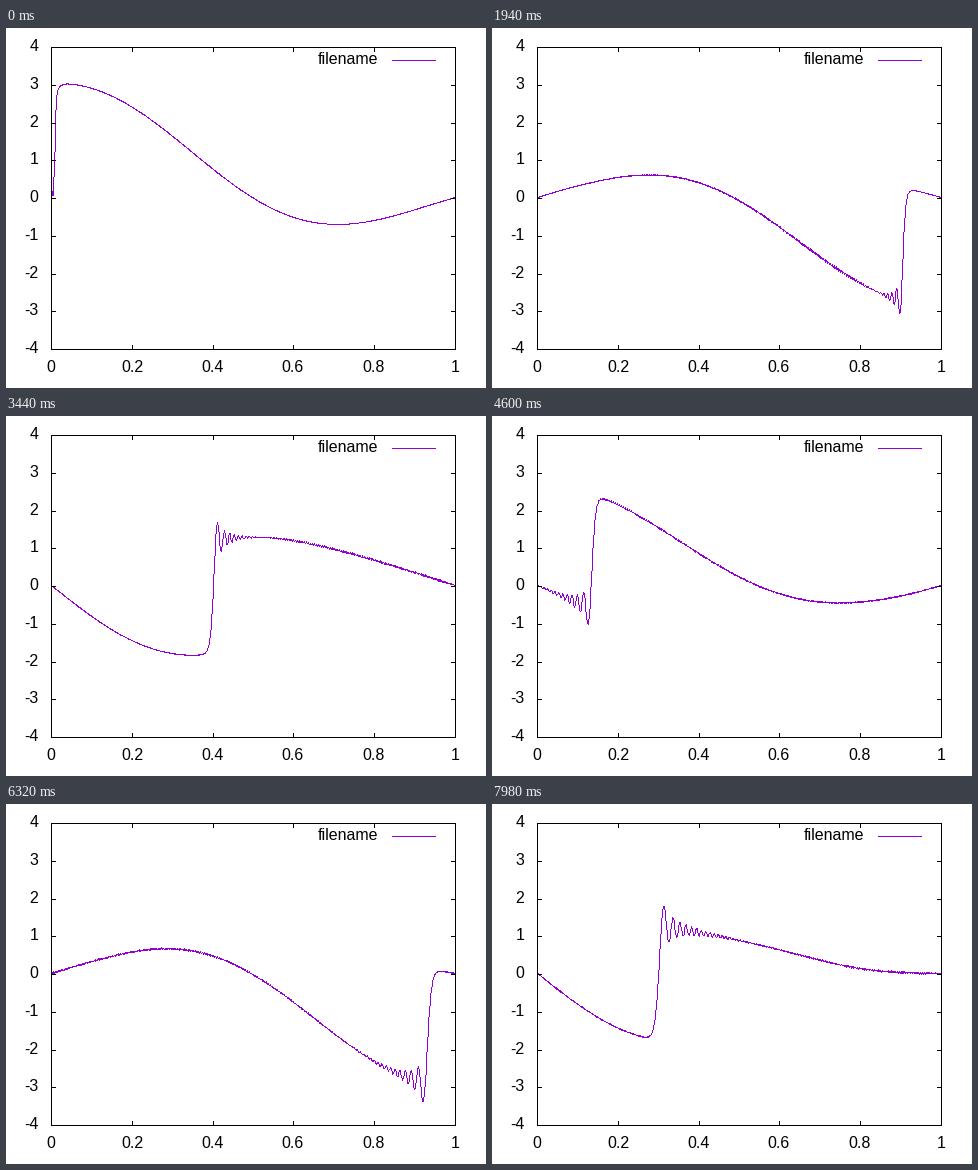
Write a matplotlib script that moves like this. It is 480 px wide and 360 px high and loops after 8000 ms.

```python
import math
import numpy as np
import matplotlib
import matplotlib.pyplot as plt
from matplotlib.animation import FuncAnimation

W, H, DPI = 480, 360, 100
LEFT, RIGHT, TOP, BOTTOM = 45, 449, 19, 321
PX = 72 / DPI
FRAMES, INTERVAL = 400, 20
PURPLE = "#9400d3"

# Leapfrog wave equation on a string with fixed ends, solved by modes
N = 1000
COURANT = 0.463
STEPS = 20

x = np.linspace(0, 1, N + 1)
k = np.arange(1, N)
modes = np.sin(np.pi * np.outer(x, k))
omega = 2 * np.arcsin(COURANT * np.sin(np.pi * k / (2 * N)))
erf = np.vectorize(math.erf)


def start_shape(x):
    body = (1 - x) * (3.02 * np.cos(np.pi * x) + 0.6 * np.sin(2 * np.pi * x)
                      - 0.04 * np.sin(np.pi * x))
    rise = (0.3 * (1 - np.exp(-x / 0.007))
            + 1.1 * erf(x / (0.0017 * math.sqrt(2))) - 0.4)
    u = body * rise
    u[0] = u[-1] = 0
    return u


coeffs = 2 / N * (modes.T @ start_shape(x))


def string_at(frame):
    return modes @ (coeffs * np.cos(omega * STEPS * (frame + 1)))


def to_x(v):
    return np.floor(LEFT + (RIGHT - LEFT) * v + 0.5)


def to_y(v):
    return np.floor(BOTTOM - (BOTTOM - TOP) * (v + 4) / 8 + 0.5)


def trace(px, py):
    """Pixels of a one-pixel-wide polyline through whole-pixel points."""
    dx, dy = np.diff(px), np.diff(py)
    count = np.maximum(np.maximum(abs(dx), abs(dy)), 1).astype(int)
    seg = np.repeat(np.arange(len(count)), count)
    step = np.arange(len(seg)) - (np.cumsum(count) - count)[seg]
    part = step / count[seg]
    return np.rint(px[seg] + part * dx[seg]), np.rint(py[seg] + part * dy[seg])


fig = plt.figure(figsize=(W / DPI, H / DPI), dpi=DPI, facecolor="white")
ax = fig.add_axes([0, 0, 1, 1])
ax.set_xlim(0, W)
ax.set_ylim(H, 0)
ax.axis("off")


def stroke(xs, ys, color="black"):
    ax.plot(xs, ys, color=color, lw=PX, antialiased=False, zorder=3, snap=True,
            solid_capstyle="projecting", solid_joinstyle="miter")


def label(px, baseline, text, ha):
    ax.text(px, baseline, text, ha=ha, va="baseline", color="black",
            family="Liberation Sans", fontsize=16 * PX)


stroke([LEFT, RIGHT, RIGHT, LEFT, LEFT], [TOP, TOP, BOTTOM, BOTTOM, TOP])

for v in range(-4, 5):
    y = to_y(v)
    stroke([LEFT, LEFT + 4], [y, y])
    stroke([RIGHT - 4, RIGHT], [y, y])
    label(32.5, y + 4, str(v), "right")

for i in range(6):
    px = to_x(i / 5)
    stroke([px, px], [BOTTOM, BOTTOM - 4])
    stroke([px, px], [TOP, TOP + 4])
    label(px, 344, f"{i / 5:g}", "center")

label(372, 36, "filename", "right")
stroke([386, 429], [32, 32], PURPLE)

curve, = ax.plot([], [], ",", color=PURPLE, zorder=2)


def update(frame):
    xs, ys = trace(to_x(x), to_y(string_at(frame)))
    # a quarter pixel keeps each dot clear of rounding edges
    curve.set_data(xs + 0.25, ys + 0.25)
    return curve,


anim = FuncAnimation(fig, update, frames=FRAMES, interval=INTERVAL,
                     repeat=True, repeat_delay=0)
plt.show()
```
